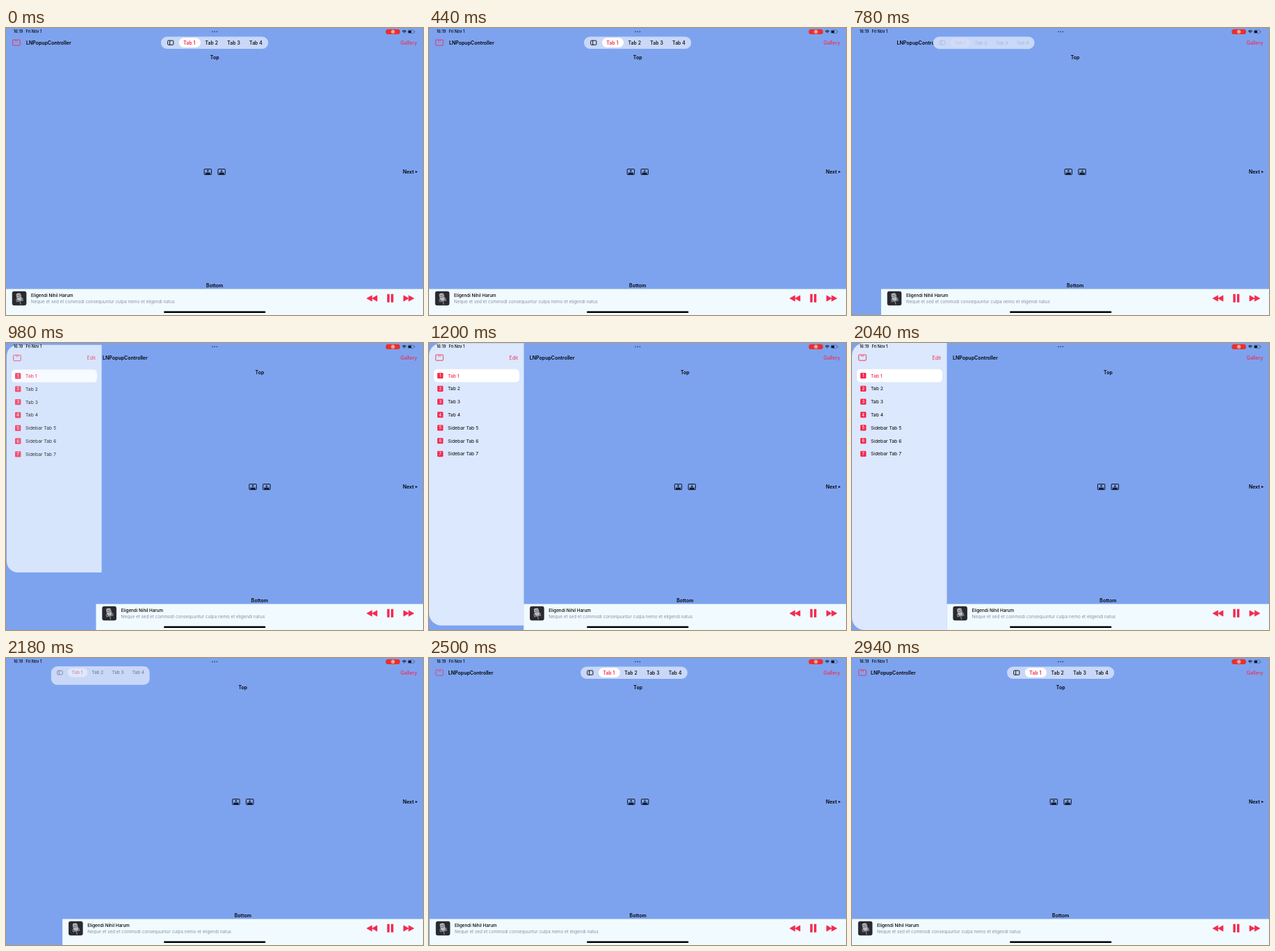
An HTML page that plays this animation: 600x414 px, repeating every 2.96 s.

```html
<!DOCTYPE html>
<html lang="en">
<head>
<meta charset="utf-8">
<title>Tab bar and sidebar</title>
<style>
html, body { margin: 0; width: 100%; height: 100%; overflow: hidden; background: #7da3ef; }
svg { display: block; width: 600px; height: 414px; }
text { font: 500 7px Inter, "Open Sans", sans-serif; white-space: pre; }
.bold { font-weight: 600; }
.mid { text-anchor: middle; }
.red { fill: #f5294f; }
.line { fill: none; stroke: #000; stroke-width: .9; }
.line.red { stroke: #f5294f; }
.small { font-size: 5.6px; }
.song { font-size: 6.3px; }
.row { font-size: 6.75px; font-weight: 400; }
.num { font-size: 5.6px; fill: #fff; }
</style>
</head>
<body>
<svg viewBox="0 0 600 414">
  <defs>
    <clipPath id="pillClip"><path id="clipShape"/></clipPath>
    <g id="window">
      <rect class="line red" x="-5.3" y="-4" width="10.6" height="8.2" rx="1"/>
      <path class="line red" d="M-2 -2.2H2" stroke-dasharray="1.2 .4"/>
    </g>
    <g id="tray">
      <rect class="line" x="-5.2" y="-4" width="10.4" height="8" rx=".8"/>
      <path d="M-3.6 1.2H3.6V3.2H-3.6z"/>
    </g>
    <path id="skip" class="red" d="M0 -4.2L7.4 0L0 4.2zM7.4 -4.2L15 0L7.4 4.2z"
      stroke="#f5294f" stroke-width=".6" stroke-linejoin="round"/>
  </defs>

  <rect width="600" height="414" fill="#7da3ef"/>

  <g id="center">
    <text class="bold mid" y="44.6">Top</text>
    <text class="bold mid" y="374.4">Bottom</text>
    <g transform="translate(-9.8 207.5)">
      <use href="#tray"/><path class="line" d="M0 .6V-2.4M-1.4 -1.2L0 -2.6L1.4 -1.2"/>
    </g>
    <g transform="translate(10 207.5)">
      <use href="#tray"/><path class="line" d="M0 -2.8V.2M-1.4 -1L0 .4L1.4 -1"/>
    </g>
  </g>
  <text class="bold" x="571" y="210">Next</text>
  <path d="M589.2 205.9L592.4 207.5L589.2 209.1z"/>

  <use id="navIcon" href="#window" x="15" y="21"/>
  <text id="title" class="bold" y="23.7">LNPopupController</text>
  <text class="red" x="591.5" y="23.7" text-anchor="end">Gallery</text>

  <path id="pill"/>
  <g clip-path="url(#pillClip)">
    <g id="tabs">
      <rect class="line" x="9.7" y="-3" width="8.2" height="6.2" rx="1"/>
      <path class="line" d="M12.7 -3V3.2"/>
      <rect x="26" y="-7" width="31" height="14" rx="7" fill="#fff"/>
    </g>
    <g id="sidebar">
      <use href="#window" x="15" y="21"/>
      <text class="red" x="115.5" y="23.7" style="font-weight:400">Edit</text>
      <rect x="7" y="37.8" width="123" height="18.6" rx="5" fill="#fff"/>
    </g>
  </g>

  <g id="player">
    <rect y="376.5" width="600" height="38" fill="#f1fbff"/>
    <rect x="8.8" y="379.7" width="20.6" height="20.6" rx="3" fill="#292a30"/>
    <g transform="translate(19 389) rotate(-12)">
      <rect x="-3.6" y="-6.5" width="7" height="11" rx="2.6" fill="#b9babd"/>
      <path d="M-3 -3.6H3M-3 -1H3" stroke="#55565c" stroke-width=".8"/>
      <path d="M-4.6 1V5H4.4V1M0 5V10" fill="none" stroke="#85868b" stroke-width="1.3"/>
    </g>
    <text class="song" x="36" y="388">Eligendi Nihil Harum</text>
    <text class="song" x="36" y="396.6" fill="#8590a5" style="font-weight:400">Neque et sed et commodi consequuntur culpa nemo et eligendi natus</text>
  </g>
  <use href="#skip" transform="translate(534 390) scale(-1 1)"/>
  <path class="red" d="M548.4 383.8h3.4v12h-3.4zM554 383.8h3.4v12h-3.4z"/>
  <use href="#skip" x="572" y="390"/>
  <rect x="227" y="408.4" width="146.5" height="2.6" rx="1.3"/>

  <text class="small" x="11" y="7.3">16:19</text>
  <text class="small" x="28.5" y="7.3">Fri Nov 1</text>
  <path d="M297 5.3h0M300.2 5.3h0M303.4 5.3h0" stroke="#30446f" stroke-width="1.8" stroke-linecap="round"/>
  <rect x="546.3" y="1.7" width="20.7" height="7.4" rx="3.7" fill="#e8302c"/>
  <circle cx="556.7" cy="5.4" r="2.3" fill="none" stroke="#fff" stroke-width=".7"/>
  <circle cx="556.7" cy="5.4" r="1.1" fill="#fff"/>
  <path class="line" d="M570.4 4.4Q573 2.2 575.6 4.4M571.5 5.7Q573 4.5 574.5 5.7M573 7h.01" stroke-linecap="round"/>
  <rect x="578.4" y="3.1" width="8.6" height="4.5" rx="1.3" fill="none" stroke="#405277" stroke-width=".6"/>
  <path d="M579.1 3.8h4v3.1h-4z"/>
  <path d="M588.1 4.6v1.5" stroke="#405277" stroke-width=".7"/>
</svg>
<script>
const LOOP = 2960, OPEN = 719, CLOSE = 2102, SIDE = 136.5;
const $ = id => document.getElementById(id);
const clamp = v => Math.min(1, Math.max(0, v));
const mix = (a, b, k) => a + (b - a) * k;

// Critically damped spring from 0 to 1
function spring(ms, rate) {
  const x = Math.max(0, ms) / 1000 * rate;
  return 1 - (1 + x) * Math.exp(-x);
}

[1, 2, 3, 4].forEach((n, i) => {
  const style = i ? 'mid' : 'mid red bold';
  $('tabs').innerHTML += `<text class="${style}" x="${40.8 + 31.9 * i}" y="2.6">Tab ${n}</text>`;
});
for (let i = 0; i < 7; i++) {
  const y = 47.1 + 18.8 * i, name = (i > 3 ? 'Sidebar Tab ' : 'Tab ') + (i + 1);
  $('sidebar').innerHTML += `<rect class="red" x="12" y="${y - 4.2}" width="8.4" height="8.4" rx="1.3"/>
    <text class="num mid" x="16.2" y="${y + 2}">${i + 1}</text>
    <text class="row ${i ? '' : 'red'}" x="27" y="${y + 2.4}"${i ? '' : ' style="font-weight:500"'}>${name}</text>`;
}

function pillPath(x, y, w, h, left, right) {
  const arc = (r, dx, dy) => `a${r} ${r} 0 0 1 ${dx} ${dy}`;
  return `M${x + left} ${y}h${w - left - right}${arc(right, right, right)}v${h - 2 * right}` +
    `${arc(right, -right, right)}h${left + right - w}${arc(left, -left, -left)}v${2 * left - h}${arc(left, left, -left)}z`;
}

function draw(t) {
  const closing = t >= CLOSE;
  const shift = closing ? 1 - spring(t - CLOSE, 17.6) : spring(t - OPEN, 18);
  const slide = closing ? 1 - spring(t - 2107, 14.5) : spring(t - 727, 29.7);
  const grow = closing ? 1 - spring(t - 2100, 70) : spring(t - 779, 14.3);
  const tabsAlpha = closing ? clamp((t - 2110) / 175) : clamp(1 - (t - OPEN) / 72);
  const iconAlpha = closing ? clamp((t - 2260) / 320) : +(t < OPEN);

  const move = (id, x, y = 0) => $(id).setAttribute('transform', `translate(${x} ${y})`);
  const edge = SIDE * shift, base = closing ? 27 : 29;
  move('player', edge);
  move('center', 300.2 + edge / 2);
  move('title', mix(base, 145, shift));
  $('navIcon').style.opacity = iconAlpha;

  const x = mix(223, 0, slide), w = mix(154.3, SIDE, slide);
  const y = mix(12.4, 0, grow), h = mix(17.6, 414, grow);
  const shape = pillPath(x, y, w, h, mix(8.8, 18, grow), 8.8 * clamp(1 - 2 * grow));
  $('pill').setAttribute('d', shape);
  $('clipShape').setAttribute('d', shape);
  $('pill').style.fill = `rgb(${mix(201, 219, grow)},${mix(216, 232, grow)},${mix(248, 253, grow)})`;

  $('tabs').setAttribute('transform', `translate(${x} 21.1) scale(${w / 154.3})`);
  $('tabs').style.opacity = tabsAlpha;
  move('sidebar', x, y / 6);
  $('sidebar').style.opacity = grow;
}

function tick() {
  draw(performance.now() % LOOP);
  requestAnimationFrame(tick);
}
tick();
</script>
</body>
</html>
```
